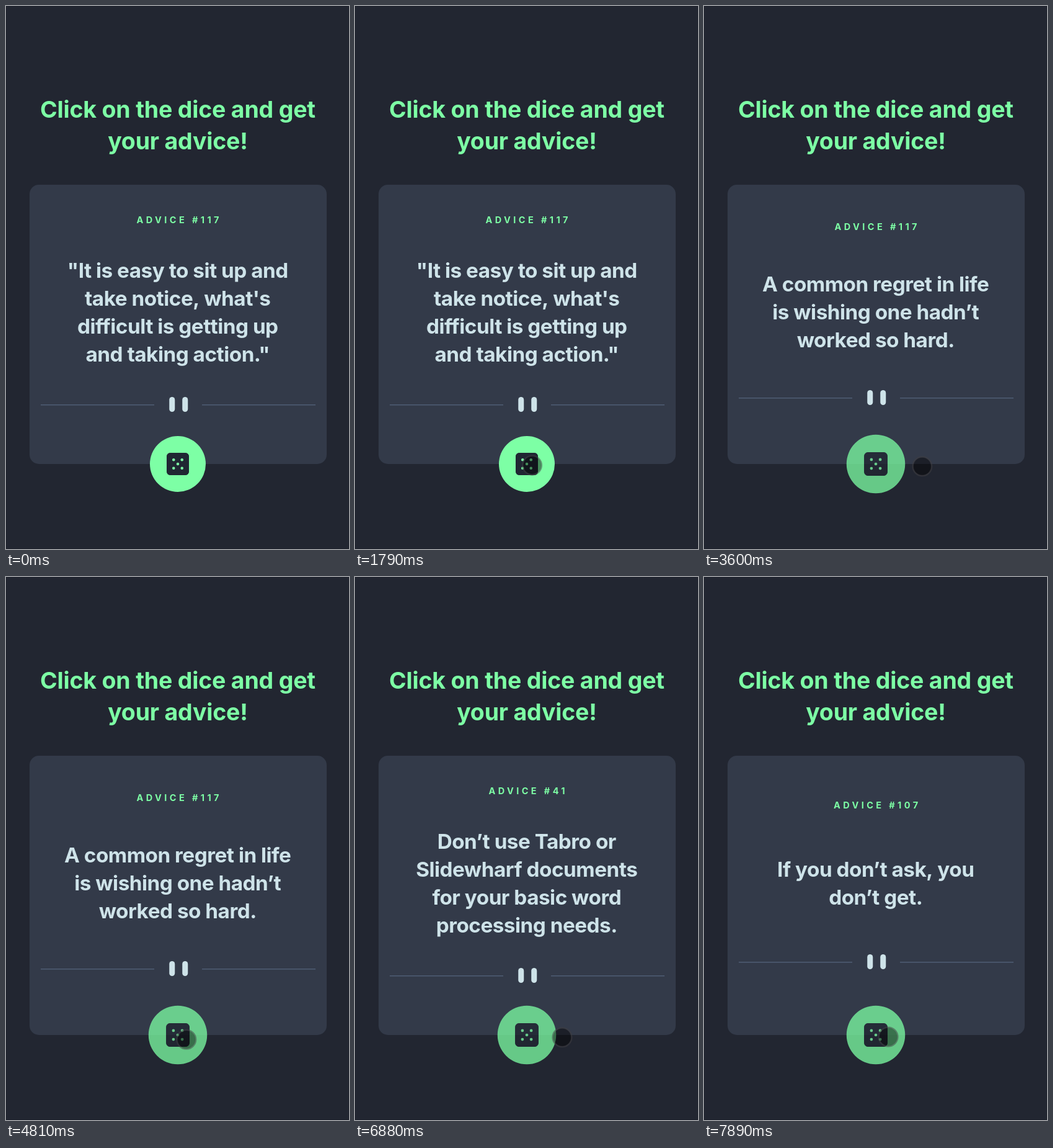
Recreate the animation shown at these times as an HTML page with a canvas. Size 553 by 875 pixels, loop 8000 ms.

```html
<!DOCTYPE html>
<html lang="en">
<head>
<meta charset="utf-8">
<title>Advice dice</title>
<style>
  html, body { margin: 0; width: 100%; height: 100%; overflow: hidden; background: #222631; }
  canvas { display: block; width: 553px; height: 875px; }
</style>
</head>
<body>
<canvas id="stage" width="553" height="875"></canvas>
<script>
const ctx = document.getElementById('stage').getContext('2d');
const LOOP = 8000;
const TICK = 67;
const CENTER = 277;
const FONT = 'Inter, "Open Sans", sans-serif';
const GREEN = '#7dffa5';
const DARK = '#222631';
const PALE = '#cee3e9';

const slips = [
  { at: 0, id: 117, lines: ['"It is easy to sit up and', "take notice, what's", 'difficult is getting up', 'and taking action."'] },
  { at: 2450, id: 117, lines: ['A common regret in life', 'is wishing one hadn’t', 'worked so hard.'] },
  { at: 5080, id: 41, lines: ['Don’t use Tabro or', 'Slidewharf documents', 'for your basic word', 'processing needs.'] },
  { at: 7820, id: 107, lines: ['If you don’t ask, you', 'don’t get.'] }
];

// Each move starts where the last one ended; power shapes the sideways easing.
const entry = { x: 442, y: 874 };
const moves = [
  { at: 650, steps: 11, x: 285.5, y: 740, power: 1 },
  { at: 1790, steps: 14, x: 352, y: 741, power: 3 },
  { at: 3600, steps: 8, x: 285.5, y: 745, power: 3 },
  { at: 4810, steps: 6, x: 317, y: 746, power: 1 },
  { at: 5350, steps: 8, x: 364, y: 742, power: 1 },
  { at: 6880, steps: 5, x: 297, y: 741, power: 0.5 }
];

const clamp = v => Math.min(1, Math.max(0, v));
const mix = (a, b, k) => a + (b - a) * k;
const current = (list, t) => list.findLastIndex(item => item.at <= t);

function disc(x, y, r, fill) {
  ctx.fillStyle = fill;
  ctx.beginPath();
  ctx.arc(x, y, r, 0, Math.PI * 2);
  ctx.fill();
}

function box(x, y, w, h, r, fill) {
  ctx.fillStyle = fill;
  ctx.beginPath();
  ctx.roundRect(x, y, w, h, r);
  ctx.fill();
}

function text(str, y, size, weight, fill, spacing) {
  ctx.font = `${weight} ${size}px ${FONT}`;
  ctx.letterSpacing = spacing + 'px';
  ctx.textAlign = 'center';
  ctx.fillStyle = fill;
  ctx.fillText(str, CENTER + spacing / 2, y);
}

function drawCard({ id, lines }) {
  box(38, 288, 479, 450, 15, '#333a49');
  const spare = 4 - lines.length;
  text('ADVICE #' + id, 350 + spare * 11.25, 14.5, 700, GREEN, 4.4);
  lines.forEach((line, i) =>
    text(line, 437.5 + spare * 22.5 + i * 45, 33.3, 650, PALE, -0.5));

  const y = Math.round(642 - spare * 11.25);
  for (const x of [56, 316]) box(x, y, 183, 1.5, 0, '#4f5d74');
  for (const x of [263.25, 284.25]) box(x, y - 12, 9, 24, 4.5, PALE);
}

function drawButton(hover) {
  const size = 1 + 0.05 * hover;
  ctx.save();
  ctx.translate(CENTER, 738);
  ctx.scale(size, size);
  ctx.globalAlpha = 1 - 0.25 * hover;
  // The die is cut out so the faded button stays one even layer.
  ctx.fillStyle = GREEN;
  ctx.beginPath();
  ctx.arc(0, 0, 45, 0, Math.PI * 2);
  ctx.roundRect(-18, -18, 36, 36, 6);
  ctx.fill('evenodd');
  box(-18, -18, 36, 36, 6, '#202733');
  disc(0, 0, 2.25, GREEN);
  for (const x of [-6.75, 6.75]) {
    for (const y of [-6.75, 6.75]) disc(x, y, 2.25, GREEN);
  }
  ctx.restore();
}

function drawPointer(t) {
  const i = current(moves, t);
  if (i < 0) return;
  const from = moves[i - 1] || entry, to = moves[i];
  const k = clamp((Math.floor((t - to.at) / TICK) + 1) / to.steps);
  const x = mix(from.x, to.x, k ** to.power);
  const y = mix(from.y, to.y, 1 - (1 - k) ** 1.5);
  disc(x, y, 14.5, 'rgba(0, 0, 0, 0.45)');
  ctx.strokeStyle = 'rgba(64, 62, 66, 0.5)';
  ctx.lineWidth = 2.5;
  ctx.beginPath();
  ctx.arc(x, y, 15.3, 0, Math.PI * 2);
  ctx.stroke();
}

function draw(t) {
  ctx.fillStyle = DARK;
  ctx.fillRect(0, 0, 553, 875);
  ctx.strokeStyle = '#1a1e28';
  ctx.lineWidth = 1;
  ctx.strokeRect(0.5, 0.5, 552, 874);

  text('Click on the dice and get', 180, 37.5, 650, GREEN, -0.2);
  text('your advice!', 231, 37.5, 650, GREEN, -0.2);
  drawCard(slips[current(slips, t)]);
  drawButton(clamp((t - 1860) / 200));
  drawPointer(t);
}

const origin = performance.now();
function loop() {
  draw((performance.now() - origin) % LOOP);
  requestAnimationFrame(loop);
}
loop();
</script>
</body>
</html>
```
